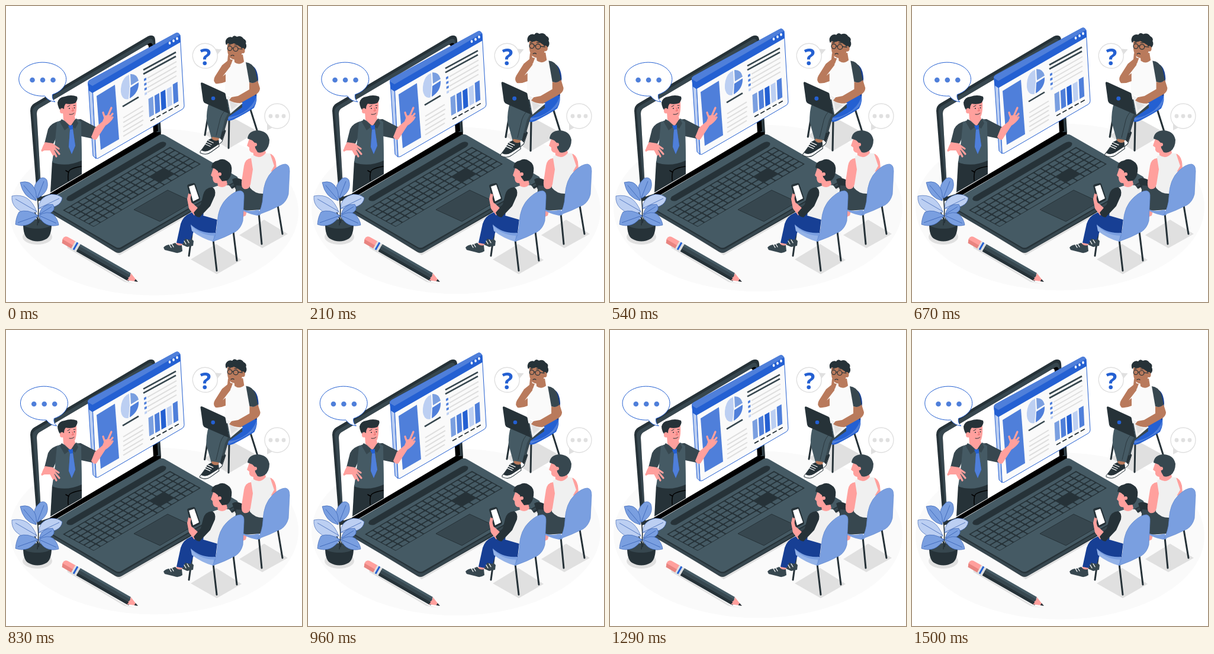
An HTML page for the animation above (1.54 s loop, 500x500 px).

```html
<!DOCTYPE html>
<html lang="en">
<head>
<meta charset="utf-8">
<title>Online presentation</title>
<style>
html, body { margin: 0; width: 100%; height: 100%; overflow: hidden; background: #fff }
svg { display: block; width: 100%; height: 100% }
.ink { fill: #263238 } .slate { fill: #37474f } .steel { fill: #455a64 }
.blue { fill: #2460d2 } .mid { fill: #4f7fda } .light { fill: #7a9fe0 } .pale { fill: #bccff2 } .navy { fill: #173f94 }
.skin { fill: #ffa09d } .brown { fill: #b97a5c } .shirt { fill: #f0f0f0 } .white { fill: #fff } .grey { fill: #e0e0e0 }
.line { fill: none; stroke: #263238; stroke-linecap: round; stroke-linejoin: round }
.legs { fill: none; stroke: #263238; stroke-width: 3; stroke-linecap: round }
.fingers { fill: none; stroke: #ffa09d; stroke-width: 3.2; stroke-linecap: round; stroke-linejoin: round }
.laces { fill: none; stroke: #fff; stroke-width: 1.3; stroke-linecap: round }
.vein { fill: none; stroke: #2d58ae; stroke-width: .7 }
</style>
</head>
<body>
<svg viewBox="0 0 500 500">
<ellipse id="floor" cx="250" cy="348" rx="244" ry="141" fill="#fafafa"/>

<g class="grey">
  <path d="M70 346L192 421 392 306 380 292Z"/>
  <ellipse cx="53" cy="390" rx="25" ry="13"/>
  <path d="M103 405L205 466 222 470 200 466 104 409Z"/>
  <path d="M312 428L355 402 398 429 356 453Z"/>
  <path d="M394 387L436 361 476 385 433 409Z"/>
</g>

<g id="laptop">
  <path class="ink" d="M53 330L41 177Q41 169 47 165L240 51Q251 47 252 57L262 214 75 325Z"/>
  <path class="slate" d="M58 322L45 178Q45 172 50 169L241 56Q248 53 249 62L259 212Z"/>
  <path d="M60 322L52 182Q52 176 56 173L242 63Q247 61 248 67L257 211Z"/>
  <path class="white" d="M60 322L52 182Q52 176 56 173L237 66Q241 64 241 70L249 214 75 317Z"/>
  <path d="M74 317L249 213 261 213 262 217 76 324Z"/>
  <path class="ink" d="M70 336V345L184 415Q190 419 196 415L392 303V292L263 217Z"/>
  <path class="slate" d="M70 342L186 410Q190 412 195 410L392 295V299L196 415Q190 418 186 415L70 347Z"/>
  <path class="steel" d="M71 328L257 219Q262 215 268 218L390 288Q394 291 389 295L195 407Q190 410 185 407L72 341Z"/>
  <path class="ink" d="M104 322L257 232Q265 227 270 231 272 235 266 239L112 329Q104 331 102 326Z"/>
  <path class="ink" d="M96 345L277 238 329 267 148 373Z"/>
  <g id="keys" class="steel" transform="matrix(12 -7.07 8.5 4.67 97 345)"/>
  <path class="slate" stroke="#263238" d="M216 344L273 311 316 331 260 364Z"/>
</g>

<g id="panel">
  <path class="pale" stroke="#2460d2" d="M139 132L146 136 152 258 147 253Z"/>
  <path fill="#fafafa" stroke="#2460d2" d="M146 136L294 49 301 169Q301 173 297 175L156 257Q152 259 152 254Z"/>
  <path class="blue" d="M138 130Q138 127 141 125L286 46Q291 43 294 49L295 61 146 147 140 143Z"/>
  <path class="mid" d="M138 130Q138 127 141 125L286 46Q291 43 294 49L146 135Z"/>
  <g class="white"><ellipse cx="276.5" cy="62.5" rx="1.8" ry="2.5"/><ellipse cx="283" cy="58.8" rx="1.8" ry="2.5"/><ellipse cx="289" cy="55" rx="1.8" ry="2.5"/></g>
  <path class="mid" d="M153 152L184 133 191 225 160 243Z"/>
  <path class="pale" d="M209 136L208 116Q198 120 195 133 192 147 197 154 201 159 207 157Z"/>
  <path class="light" d="M211 134L210 115Q221 114 224 126Z"/>
  <path class="mid" d="M210 138L224 129Q225 146 209 156Z"/>
  <g class="line">
    <path style="stroke:#37474f" stroke-width="2.6" stroke-linecap="butt" d="M197 170L224 154M232 108L287 78M232 115L287 85"/>
    <path id="copy" style="stroke:#dedede" stroke-width="2" stroke-linecap="butt"/>
    <path id="ticks" stroke-width="1.8" stroke-linecap="butt"/>
  </g>
  <g id="bars"></g>
</g>

<g id="presenter">
  <path class="ink" d="M78 262L128 256V284L75 315Z"/>
  <path class="line" style="stroke:#000" stroke-width="1.5" d="M105 295Q104 280 108 277 114 273 127 271M106 281L101 278"/>
  <path class="slate" d="M92 194Q76 197 71 208L65 232 78 237 84 224 82 262 128 258 127 220 146 224 153 205 126 191Z"/>
  <path class="steel" d="M86 196L96 192 110 203 119 190 127 196 128 261Q101 273 78 264L83 228Z"/>
  <path class="skin" d="M96 178L97 192 109 203 117 191 115 182Z"/>
  <path class="skin" d="M95 164Q92 183 103 188 112 192 117 185 120 176 119 162 107 156 95 164Z"/>
  <path class="ink" d="M95 180Q87 172 87 163 89 154 99 153 110 149 120 153 122 158 117 164 109 167 101 165 98 168 98 174L95 175Z"/>
  <ellipse class="skin" cx="94.500" cy="177" rx="3.500" ry="4.500"/>
  <g class="line" stroke-width="1"><path d="M104 170L108 168M114 168L117 168M107 183Q112 184 115 181"/><path style="stroke:#e06060" d="M112 172L114 177 111 177"/></g>
  <circle class="ink" cx="107" cy="173" r="1"/><circle class="ink" cx="115.500" cy="172" r="1"/>
  <path class="slate" d="M94 191L108 203 99 210 91 196ZM110 203L118 190 122 198 117 207Z"/>
  <path class="blue" d="M105 202L113 201 113 208 117 236 111 250 106 238 108 209Z"/>
  <path class="mid" d="M108 209L113 208 117 236 111 250 106 238Z"/>
  <path class="skin" d="M66 230L79 232 84 236 82 243 73 244 65 244 60 246Q60 240 66 230Z"/>
  <path class="fingers" d="M67 236L61 244M74 240L80 251M78 240L85 254M80 238L90 250M80 235L89 241"/>
  <path class="skin" d="M144 221Q149 209 150 206L163 195 167 185 175 184 180 191Q175 198 168 202L153 225Q148 228 144 221Z"/>
  <path class="fingers" d="M168 192L164 180M171 188L178 172M175 188L180 182M175 194L180 188"/>
</g>

<g id="bubble">
  <path class="white" stroke="#2460d2" d="M65.500 152A40 28.500 0 1 1 78.500 149.500Q77 157 83 162 72 161 65.500 152Z"/>
  <g class="mid"><circle cx="44.500" cy="125" r="4.300"/><circle cx="62" cy="125" r="4.300"/><circle cx="79.500" cy="125" r="4.300"/></g>
</g>

<g id="plant">
  <path class="ink" d="M29 368Q29 388 37 393 53 402 69 393 77 387 77 368Z"/>
  <ellipse class="slate" cx="53" cy="368" rx="24" ry="8"/>
  <path class="line" stroke-width="1.600" d="M53 370Q57 342 52 318M54 366Q53 354 44 341M55 366Q57 352 66 341"/>
  <g stroke="#2d58ae" stroke-width=".6">
    <path class="light" d="M53 325Q40 306 58 291 65 288 69 294 75 313 53 325Z"/>
    <path class="light" d="M51 329Q29 324 24 298 42 293 49 310 52 317 51 329Z"/>
    <path class="pale" d="M52 348Q31 355 17 341 9 333 10 321 40 315 52 348Z"/>
    <path class="pale" d="M55 342Q55 323 76 318 87 317 95 324 93 343 55 342Z"/>
    <path class="light" d="M56 352Q60 334 79 335 86 345 72 351 63 354 56 352Z"/>
    <path class="light" d="M54 354Q36 342 22 348 17 356 16 369 39 377 54 354Z"/>
    <path class="light" d="M55 354Q70 345 80 352 88 361 89 370 65 376 55 354Z"/>
  </g>
  <path class="vein" d="M53 324L64 296M51 328L30 303M52 347L16 326M55 342L90 325M56 352L77 339M54 354L20 366M56 354L85 367"/>
</g>

<g id="pencil" transform="translate(98 394.500) rotate(29.800)">
  <path class="skin" d="M0-6Q-5-1 0 6L19 7V-7H3Z"/><path fill="#e88480" d="M-2 1L19 1V7H0Z"/>
  <path class="grey" d="M18-7H31V7H18Z"/><path class="blue" d="M21-7H24V7H21Z"/>
  <path class="steel" d="M28-7H126L130 7H28Z"/><path class="ink" d="M28 2H129L127 7H28Z"/><path class="slate" d="M28-3H127V2H28Z"/>
  <path class="skin" d="M126-7L143 0 126 7Q129 3 126 2 129-1 126-7Z"/><path class="ink" d="M138-2.200L144 0 138 2.200Z"/>
</g>

<g id="thinker">
  <path class="grey" d="M335 216L382 188 426 212 376 241Z"/>
  <path class="legs" d="M343 175L336 218M377 190L376 240M412 172L424 210"/>
  <path class="blue" d="M366 181L397 161 422 144Q426 159 419 172 406 181 384 192 375 196 370 191Z"/>
  <path class="mid" d="M369 186Q382 190 400 180 417 170 423 153 423 165 417 171 397 185 377 192Z"/>
  <path class="navy" d="M416 101Q425 106 426 124L423 152 416 150Z"/>
  <path class="white" stroke="#263238" d="M357 224L366 206 371 211 365 229 356 237Z"/>
  <path class="ink" d="M358 220L366 206 371 211 365 227Z"/>
  <path class="slate" d="M351 158L398 157 399 171 376 187 369 211 354 214Z"/>
  <path class="steel" d="M343 162L381 170 370 191 362 223Q354 227 347 223L339 194Q338 178 343 162Z"/>
  <path class="line" stroke-width=".8" d="M378 171Q366 177 362 190L355 219"/>
  <path class="brown" d="M348 221L360 223 358 231 347 228Z"/>
  <path class="white" stroke="#263238" d="M328 246Q337 235 341 227L347 224Q352 230 359 227L360 237 346 247Q338 253 328 248Z"/>
  <path class="ink" d="M330 244Q337 235 341 227L347 224Q352 230 359 227V234L345 243Q337 248 330 244Z"/>
  <path class="laces" d="M336 233L345 237M338 230L347 234M341 227L350 231"/>
  <path fill="#fafafa" d="M371 107Q376 97 386 94L405 94 412 103 411 151Q393 162 370 147Z"/>
  <path class="brown" d="M375 92L365 100 353 119Q349 126 354 131 362 132 371 128L371 115 366 119 379 102 380 96Z"/>
  <path class="brown" d="M385 84L386 95Q394 101 402 94L400 82Z"/>
  <path class="brown" d="M374 64Q373 82 378 87 386 94 396 87L403 68Q390 57 374 64Z"/>
  <path class="ink" d="M372 66Q369 60 373 55 377 51 382 53 385 48 390 52 397 49 401 55 407 58 405 63 408 69 403 74L399 79 397 70 391 66 385 63Q378 66 375 63Z"/>
  <ellipse class="brown" cx="400" cy="75.500" rx="3.500" ry="4.500"/>
  <g class="line" stroke-width="1.200">
    <circle cx="378" cy="71.500" r="3.800"/><circle cx="388" cy="72.500" r="4"/>
    <path d="M392 72L399 73M382 71H384M376 66L379 65M386 66L390 66M380 84Q383 82 385 84"/>
  </g>
  <path class="brown" d="M374 93L375 83 377 83 379 90 383 91 380 99 372 101Z"/>
  <path class="slate" d="M405 95Q416 96 421 108L425 126Q418 132 411 129Z"/>
  <path class="shirt" d="M373 151L400 164 379 182Z"/>
  <path class="grey" d="M378 160L392 167 381 175Z"/>
  <path class="brown" d="M411 129Q418 132 425 126L429 139Q429 146 421 150L396 164Q384 164 377 159L381 154 392 152 411 141Z"/>
  <path class="ink" d="M329 131Q329 128 333 130L368 146Q371 147 371 150L377 182 336 164Q334 163 333 160Z"/>
  <circle class="blue" cx="350" cy="156" r="3.300"/>
</g>

<g id="chat">
  <path fill="#fff" stroke="#e0e0e0" stroke-width="1.400" d="M354 73A21 21 0 1 0 357 81L363 74Z"/>
  <path class="grey" d="M353 73H364L357 82Z"/>
  <text class="blue" x="337" y="99.500" font-family="'Open Sans', sans-serif" font-size="39" font-weight="700" text-anchor="middle">?</text>
  <path class="grey" d="M441 198V210L451 205Z"/>
  <circle class="white" cx="458" cy="186" r="21" stroke="#e0e0e0" stroke-width="1.400"/>
  <g class="grey"><circle cx="447" cy="186" r="3.400"/><circle cx="458" cy="186" r="3.400"/><circle cx="469" cy="186" r="3.400"/></g>
</g>

<g id="listener">
  <path class="legs" d="M401 342L398 360M427 350L432 402M459 337L467 385"/>
  <path class="skin" d="M399 344L407 346 405 354 398 357Z"/>
  <path class="ink" d="M382 293Q388 288 398 293L412 303 404 326 389 313Z"/>
  <path class="slate" d="M389 303L413 305 438 315 430 344 402 346 387 318Z"/>
  <path class="skin" d="M444 249Q453 250 456 263L457 276 445 281Z"/>
  <path class="shirt" d="M414 254Q428 247 446 249L453 270 441 291 436 317Q421 318 412 307Z"/>
  <path class="skin" d="M417 240L418 252Q430 260 439 248L436 237Z"/>
  <path class="skin" d="M411 224L407 236 411 239Q410 247 417 248 427 248 430 240L429 221Z"/>
  <path class="slate" d="M408 224Q409 211 425 210 442 211 445 226 445 239 437 245 431 249 425 247L421 240 420 231 416 227Z"/>
  <circle class="skin" cx="421" cy="234" r="3"/>
  <path class="skin" d="M414 257Q404 258 402 270L398 296Q397 307 402 309 411 311 413 301L417 276Z"/>
  <path class="light" d="M397 342Q409 349 427 344L430 353 424 354Q401 349 397 342Z"/>
  <path class="light" stroke="#5f87cf" stroke-width=".7" d="M425 353Q433 341 434 322 435 293 451 278 463 267 472 267 479 268 479 279L477 318Q474 330 465 336 445 346 425 353Z"/>
</g>

<g id="reader">
  <path class="legs" d="M314 386L309 422M350 395L356 447M384 381L390 430"/>
  <path class="slate" d="M301 393L312 392 317 397 316 405 306 407 297 403Z"/>
  <path class="navy" d="M330 355L355 360 333 383 318 378 312 395 302 393 306 368Z"/>
  <path class="navy" d="M311 350Q318 346 329 349L357 359 354 384Q336 389 312 372L299 401Q293 405 288 400L295 368Q299 355 311 350Z"/>
  <path class="skin" d="M288 400L298 402 295 409 287 406Z"/>
  <path class="slate" d="M266 408Q270 403 278 403L286 400Q290 406 297 404L298 414Q291 419 284 416L268 412Z"/>
  <path class="laces" d="M276 403L279 408M280 402L283 407M301 397L304 402M306 395L309 400"/>
  <path class="shirt" d="M345 309Q360 300 377 303L388 317 367 333 357 361 333 354Z"/>
  <path class="skin" d="M356 292L358 304Q368 309 374 301L371 289Z"/>
  <path class="skin" d="M350 274L346 286 349 289Q349 298 354 299 364 301 369 290L368 270Z"/>
  <path class="ink" d="M347 273Q348 262 358 261 366 256 374 262 383 267 381 280 380 291 373 295L365 296 360 289 358 279 353 275Z"/>
  <circle class="skin" cx="361" cy="284" r="3"/>
  <path class="skin" d="M318 354L309 342 306 326 308 317 312 314 315 333 325 342Z"/>
  <path class="ink" d="M306 304Q306 302 309 301L317 299Q319 299 320 301L328 325Q328 328 325 329L317 333Q314 334 313 331Z"/>
  <path class="white" d="M309 305L318 302 326 325 316 330Z"/>
  <path class="fingers" d="M309 330L311 319"/>
  <path class="ink" d="M333 319Q336 307 348 306 355 309 353 320L345 338 327 357Q319 356 317 349L329 335Z"/>
  <path class="light" d="M312 369Q329 385 353 383L357 394 350 398Q331 393 314 380Z"/>
  <path class="pale" d="M312 370Q327 387 351 388L350 398Q331 393 314 380Z" opacity=".4"/>
  <path class="light" stroke="#5f87cf" stroke-width=".7" d="M349 398Q356 385 357 366 358 338 375 323 387 312 396 312 403 313 402 324L400 363Q397 375 388 381 370 391 349 398Z"/>
</g>
</svg>
<script>
const LOOP = 1540, CYCLE = 1500;
const find = id => document.getElementById(id);
const repeat = (n, make) => Array.from({ length: n }, (_, i) => make(i)).join('');

find('keys').innerHTML = repeat(6, row => repeat(15, col => {
  const gap = (col === 10 || col === 11) && (row === 3 || row === 4);
  const underSpace = row === 5 && col > 4 && col < 9;
  if (gap || underSpace) return '';
  const width = row === 5 && col === 4 ? 4.84 : .84;
  return `<rect x="${col + .08}" y="${row + .12}" width="${width}" height=".78" rx=".12"/>`;
}));

find('copy').setAttribute('d',
  repeat(5, i => `M198 ${189 + i * 7.8}L${231 + i % 2} ${169 + i * 7.8}`) +
  repeat(4, i => `M239 ${122 + i * 8}L288 ${94 + i * 8}`));
find('ticks').setAttribute('d', repeat(5, i => `M${244 + i * 10.2} ${194 - i * 5.7}l7-4`));

const bar = (color, i, height) => {
  const x = 242 + i * 10.3, y = 188 - i * 5.6;
  return `<path class="${color}" d="M${x} ${y}l8-4.5-1.5-${height}-8 4.5z"/>`;
};
find('bars').innerHTML =
  bar('light', 0, 31) + bar('mid', 1, 31) + bar('blue', 2, 31) + bar('pale', 3, 31) + bar('mid', 4, 33) +
  repeat(4, i => `<path class="${i < 3 ? 'mid' : 'pale'}" d="M${233 + i * .4} ${123 + i * 8}l4-2v4l-4 2z"/>`);

// Cubic Bezier (.25, .1, .25, 1), solved by bisection
function ease(x) {
  const bezier = (a, b, s) => 3 * a * s * (1 - s) ** 2 + 3 * b * s * s * (1 - s) + s ** 3;
  let low = 0, high = 1;
  for (let i = 0; i < 20; i++) {
    const s = (low + high) / 2;
    if (bezier(.25, .25, s) < x) low = s; else high = s;
  }
  return bezier(.1, 1, low);
}

function follow(stops, p) {
  const i = Math.max(1, stops.findIndex(([at]) => at >= p));
  const [[from, a], [to, b]] = [stops[i - 1], stops[i]];
  return a + (b - a) * ease((p - from) / (to - from));
}

const shake = [0, -1, 2, -4, 4, -4, 4, -4, 2, -1, 0].map((x, i) => [i / 10, x]);
const heartbeat = [[0, 1], [.14, 1.05], [.28, 1], [.42, 1.05], [.7, 1], [1, 1]];
const start = performance.now();

function draw(now) {
  const p = Math.min(1, Math.max(0, now - start) % LOOP / CYCLE);
  const lift = `translate(0 ${-9.5 * (1 - Math.abs(1 - 2 * p))})`;
  find('panel').setAttribute('transform', lift);
  find('floor').setAttribute('transform', lift);
  find('bubble').setAttribute('transform', `translate(${follow(shake, p)} 0)`);
  find('thinker').setAttribute('transform', `translate(376 150) scale(${follow(heartbeat, p)}) translate(-376 -150)`);
  requestAnimationFrame(draw);
}
draw(start);
</script>
</body>
</html>
```
